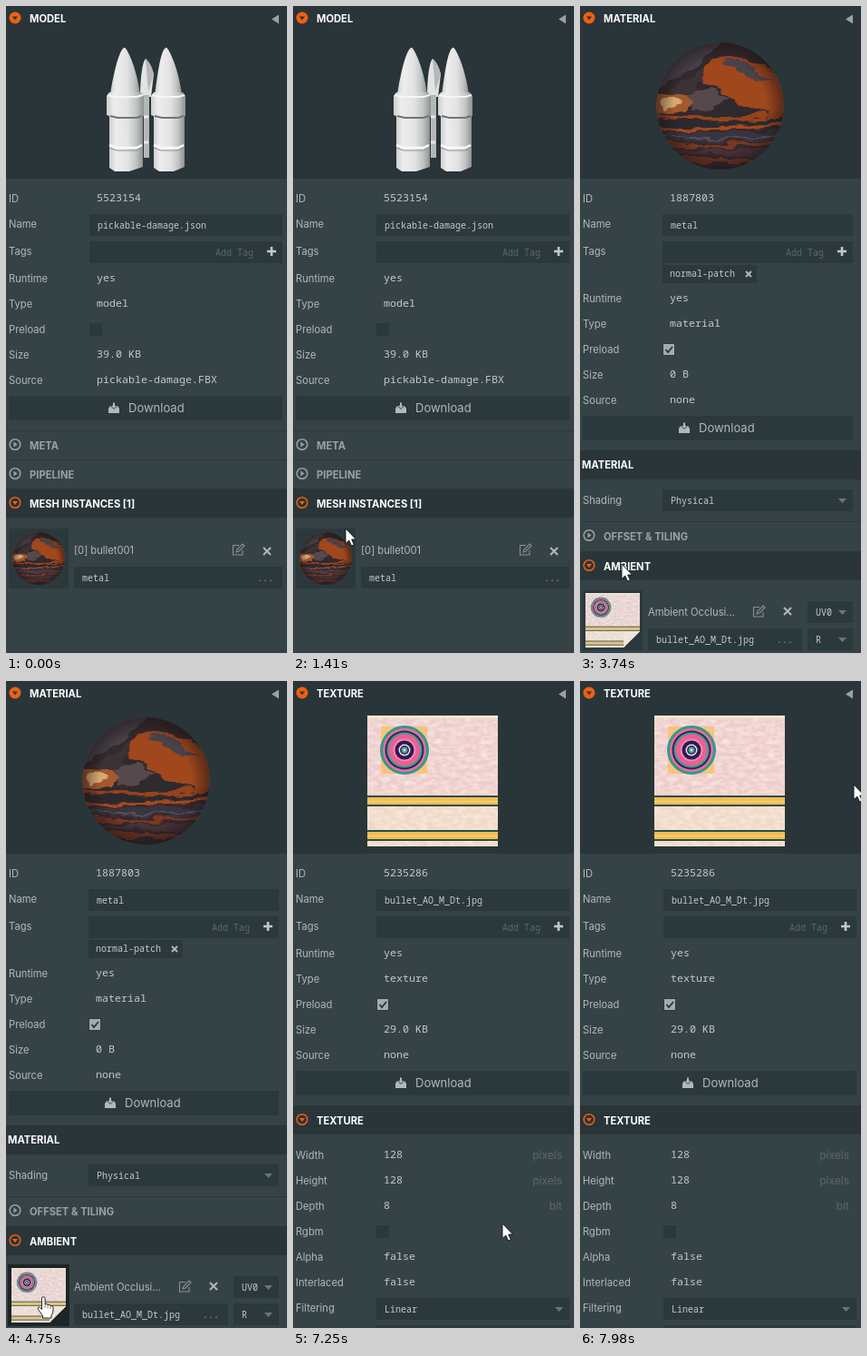
These frames come from a looping animation (310 px wide and 712 px high, 8000 ms). An HTML page:

```html
<!DOCTYPE html>
<html lang="en">
<head>
<meta charset="utf-8">
<title>Asset inspector</title>
<style>
html, body { margin: 0; width: 100%; height: 100%; overflow: hidden; background: #364346; }
svg { display: block; width: 310px; height: 712px; }
text { font-family: Inter, Roboto, sans-serif; font-size: 11.2px; white-space: pre; }
.head { font-size: 11.2px; font-weight: 700; }
.big { font-size: 13px; }
.unit { font-size: 12px; }
.value, .field { font-family: "Noto Sans Mono", "DejaVu Sans Mono", monospace; }
.value { font-size: 11.67px; }
.field { font-size: 10px; }
</style>
</head>
<body>
<svg id="stage" viewBox="0 0 310 712" xmlns="http://www.w3.org/2000/svg"></svg>
<script>
const LOOP = 8000;
const BODY = '#364346', DARK = '#293538', FIELD = '#2c393c', HOVER = '#202a2c';
const GREY = '#9ba1a3', LIGHT = '#b1b8ba', PALE = '#c3c9ca', DIM = '#5b686b', ORANGE = '#ee6011';

// Drawing helpers
const rect = (x, y, w, h, fill) => `<rect x="${x}" y="${y}" width="${w}" height="${h}" fill="${fill}"/>`;
const path = (d, fill, more = '') => `<path d="${d}" fill="${fill}" ${more}/>`;
const line = (d, color, width) => path(d, 'none', `stroke="${color}" stroke-width="${width}"`);
const text = (x, y, str, kind = '', fill = LIGHT, anchor = 'start') =>
  `<text x="${x}" y="${y + 4}" class="${kind}" fill="${fill}" text-anchor="${anchor}">${str}</text>`;
const at = (x, y, body, scale = 1) => `<g transform="translate(${x} ${y}) scale(${scale})">${body}</g>`;
const hoverable = (id, body) => `<g id="${id}" opacity="0">${body}</g>`;

const label = (y, str) => text(3, y - 0.5, str);
const value = (x, y, str) => text(x, y - 1, str, 'value', PALE);

// Icons
const cross = (x, y, r) => line(`M${x - r} ${y - r}l${2 * r} ${2 * r}m0 ${-2 * r}l${-2 * r} ${2 * r}`, LIGHT, 2);
const plus = (x, y) => line(`M${x - 5} ${y}h10m-5 -5v10`, PALE, 2.6);
const edit = (x, y) =>
  line(`M${x + 1} ${y - 4.5}h-6.500v10.500h10.500v-5`, '#889193', 1.1) +
  line(`M${x - 2} ${y + 3}l1 -3 6 -6 2 2 -6 6z`, '#889193', 1.1);

function ring(x, y, open, color) {
  const tri = open ? `M${x - 3} ${y - 1.5}h6l-3 4z` : `M${x - 1.5} ${y - 3}v6l4 -3z`;
  return `<circle cx="${x}" cy="${y}" r="5.8" fill="none" stroke="${color}" stroke-width="1.5"/>` + path(tri, color);
}

function check(x, y, on) {
  return rect(x, y, 14, 14, FIELD) + (on ? rect(x + 1, y + 1, 12, 12, '#a3abad') +
    line(`M${x + 3.5} ${y + 7}l2.500 3 5 -6`, DARK, 1.8) : '');
}

// Panel parts
function download(id, right, y) {
  const x = right - 192;
  const draw = (bg, fg) => rect(3, y, right - 3, 27, bg) +
    path(`M${x} ${y + 19}v-5l2 -3h8l2 3v5z`, fg) +
    path(`M${x + 4.5} ${y + 7}h3v3.500h2.500l-4 4 -4 -4h2.500z`, fg, `stroke="${bg}"`) +
    text(x + 22, y + 14, 'Download', 'big', fg);
  return draw(FIELD, LIGHT) + hoverable(`${id}-download`, draw(HOVER, '#fff'));
}

function field(x, y, right, str = '', dots = 0, id = '') {
  return rect(x, y, right - x, 24, FIELD) + (id && hoverable(id, rect(x, y, right - x, 24, HOVER))) +
    text(x + 9, y + 12, str, 'field', PALE) + (dots ? text(dots, y + 12, '...', 'field', GREY) : '');
}

const select = (x, y, right, str, id) =>
  field(x, y, right, str, 0, id) + path(`M${right - 16} ${y + 10}h9l-4.500 5z`, '#697679');

function section(y, title, open, id) {
  const head = (bg, icon, color) =>
    rect(0, y, 310, 32, bg) + ring(10, y + 15.5, open, icon) + text(26, y + 17, title, 'head', color);
  return (open ? head(DARK, ORANGE, '#fff') : head(BODY, GREY, GREY) + rect(0, y, 310, 1, '#2b373a')) +
    (id ? hoverable(id, head(HOVER, open ? ORANGE : '#fff', '#fff')) : '');
}

const row = (x, y, name, val) =>
  label(y, name) + (typeof val === 'string' ? value(x + 8, y, val) : check(x, y - 7, val));

function panel(title, preview) {
  return rect(0, 0, 310, 712, BODY) + rect(0, 0, 310, 190, DARK) +
    `<circle cx="10" cy="13" r="6.500" fill="${ORANGE}"/>` + path('M7 11.500h6l-3 4z', DARK) +
    text(26, 14, title, 'head', '#fff') + path('M301 9.500v10l-8 -5z', GREY) + preview;
}

function asset({ id, key, name, values, x = 92, right = 305, shift = 0 }) {
  const names = ['Runtime', 'Type', 'Preload', 'Size', 'Source'];
  return row(x, 212, 'ID', id) +
    text(3, 240, 'Name') + field(x, 229, right, name, 0, `${key}-name`) +
    text(3, 270, 'Tags') + field(x, 259, right, '', 0, `${key}-tags`) +
    text(right - 32, 271, 'Add Tag', 'field', DIM, 'end') + plus(right - 12, 270) +
    names.map((n, i) => row(x, 300 + shift + i * 28, n, values[i])).join('') +
    download(key, right, 429 + shift);
}

// Artwork
function rocket(tip, left, right) {
  const fill = 'url(#shell)', l = left + 4, r = right - 4;
  return path(`M${l} 98C${l + 3} 78 ${tip - 7} 50 ${tip - 1} 46Q${tip} 45 ${tip + 2} 48C${tip + 9} 60 ${r - 2} 80 ${r} 98z`, fill) +
    path(`M${left + 3} 120v58l6 4h16l${right - left - 26} -5v-57z`, fill) +
    path(`M${left} 99l3 -4H${right - 3}l3 4v22l-5 2H${left + 8}l-8 -3z`, fill) +
    line(`M${left + 1} 98l7 2H${right - 8}l7 -2`, '#f6f6f6', 2) +
    line(`M${left + 4} 121l8 2H${right - 8}l6 -2`, '#717576', 2) +
    line(`M${left + 3} 153l8 3H${right - 8}l6 -3`, '#f8f8f8', 2.5) +
    line(`M${left + 3} 156l8 3H${right - 8}l6 -3`, '#8f9394', 1.2);
}
const model =
  path('M148 100C148 82 150 62 154 58Q160 63 163 75L160 100z', '#e2e3e3') +
  path('M154 58Q160 63 163 75L157 94z', '#b4b7b8') + path('M152 98h6v69h-6z', '#b4b7b8') +
  line('M152 122h5M152 150h5', '#e9e9e9', 3) + rocket(131, 111, 152) + rocket(177, 160, 198);

const metal = `<g clip-path="url(#ball)"><rect width="140" height="140" fill="#34292c"/><g filter="url(#rough)">` +
  path('M-10 55Q20 45 50 20L75 -5H-10z', '#49434a') +
  path('M-5 62Q25 48 62 18L75 26Q45 62 5 74z', '#3a3134') +
  path('M55 22Q90 2 150 45V92Q95 82 78 62L50 45z', '#a0471f') +
  path('M72 20Q100 14 128 44L105 40z', '#4a434a') +
  path('M50 40L82 62Q95 78 145 80V94H55Q60 65 42 50z', '#2f2a2f') +
  path('M-5 60Q15 52 28 56L40 66 32 76 -5 78z', '#a4592f') + path('M4 62l14 -3 10 8 -20 5z', '#d6aa72') +
  path('M34 60l28 -9 18 12 -14 8 -26 3z', '#57494c') +
  line('M0 82Q70 89 140 79', '#98421f', 5) + line('M0 94Q70 98 140 90', '#a8481c', 4) +
  line('M0 88Q70 93 140 85', '#2b292e', 3) + rect(-5, 99, 150, 10, '#393640') +
  line('M0 111Q70 116 140 110', '#7d3822', 4) + line('M0 121H140', '#473338', 6) +
  line('M15 130H125', '#723621', 6) + line('M8 104Q70 109 132 103', '#605560', 1.5) +
  `</g><circle cx="70" cy="70" r="70" fill="url(#shade)"/></g>`;

const target = [[27, '#2c9c8c'], [24, '#ee6d9c'], [21.5, '#35215f'], [19.5, '#2fa48e'], [17.5, '#ed5f94'],
  [12.5, '#f18ab0'], [10.5, '#2c1b58'], [6.5, '#f2e2df'], [5, '#38225f'], [3.4, '#3aa78f'], [1.5, '#f5d9d5']];
const band = y => rect(0, y, 144, 12, '#24504a') + rect(0, y + 2, 144, 8, '#f2bd55') + rect(0, y + 6, 144, 1, '#f9d784');
const texture = square => rect(0, 0, 144, 144, '#eecbcb') +
  rect(0, 100, 144, 44, '#f0d8c6') + `<rect width="144" height="144" filter="url(#grain)"/>` +
  rect(0, 0, 144, 3, '#f6e9c8') + (square ? rect(15, 12, 51, 52, '#f8c47d') : '') +
  target.map(([r, c]) => `<circle cx="41" cy="38" r="${r}" fill="${c}"/>`).join('') + band(88) + band(126);

const thumb = (y, id, art) => rect(3, y, 66, 66, FIELD) + hoverable(id, rect(2, y - 1, 68, 68, '#1d2526')) + art;

const defs = `<defs>
<linearGradient id="shell"><stop stop-color="#cdcece"/><stop offset=".2" stop-color="#ededed"/><stop offset=".55" stop-color="#e3e3e3"/><stop offset=".8" stop-color="#c2c4c4"/><stop offset="1" stop-color="#8d9091"/></linearGradient>
<radialGradient id="shade"><stop offset=".72" stop-color="#150f12" stop-opacity="0"/><stop offset="1" stop-color="#150f12" stop-opacity=".5"/></radialGradient>
<clipPath id="ball"><circle cx="70" cy="70" r="70"/></clipPath>
<clipPath id="fold"><path d="M0 0H144V101L101 144H0z"/></clipPath>
<filter id="rough"><feTurbulence type="fractalNoise" baseFrequency=".04 .1" numOctaves="3" seed="4"/><feDisplacementMap in="SourceGraphic" scale="13" xChannelSelector="R" yChannelSelector="G"/></filter>
<filter id="grain" x="0" y="0" width="1" height="1"><feTurbulence type="fractalNoise" baseFrequency=".12 .22" numOctaves="3" seed="8"/><feColorMatrix values="0 0 0 0 .96 0 0 0 0 .88 0 0 0 0 .8 1.500 0 0 0 -.5"/></filter>
</defs>`;

const modelScene = panel('MODEL', model) +
  asset({ id: '5523154', key: 'model', name: 'pickable-damage.json',
    values: ['yes', 'model', false, '39.0 KB', 'pickable-damage.FBX'] }) +
  section(467, 'META', false, 'meta') + section(499, 'PIPELINE', false, 'pipeline') +
  section(531, 'MESH INSTANCES [1]', true, 'mesh') +
  thumb(575, 'ball-thumb', at(7, 579, metal, 0.414)) +
  text(75, 599, '[0] bullet001') + edit(256, 598) + cross(288, 600, 4) + field(75, 617, 305, 'metal', 277);

const materialScene = panel('MATERIAL', at(84.5, 40, metal)) +
  asset({ id: '1887803', key: 'material', name: 'metal', values: ['yes', 'material', true, '0 B', 'none'],
    x: 91, right: 301, shift: 22 }) +
  rect(91, 285, 104, 20, FIELD) + text(99, 294, 'normal-patch', 'field', PALE) + cross(186, 295, 3) +
  rect(0, 489, 310, 32, DARK) + text(2, 505, 'MATERIAL', 'head', '#fff') +
  label(544, 'Shading') + select(91, 532, 301, 'Physical') +
  section(567, 'OFFSET &amp; TILING', false) + section(600, 'AMBIENT', true) +
  thumb(643, 'map-thumb', at(6, 646,
    `<g clip-path="url(#fold)" style="filter:saturate(.65)">${texture(false)}</g>` + path('M144 101L101 144V101z', '#f3e4da'), 0.417)) +
  text(75, 667, 'Ambient Occlusi...') + edit(197, 666) + cross(229, 666, 4) + select(251, 655, 301, 'UV0') +
  field(75, 685, 245, 'bullet_AO_M_Dt.jpg', 217) + select(251, 685, 301, 'R');

const unit = (y, str) => text(297, y, str, 'unit', DIM, 'end');
const details = [['Width', '128'], ['Height', '128'], ['Depth', '8'], ['Rgbm', false], ['Alpha', 'false'], ['Interlaced', 'false']];
const textureScene = panel('TEXTURE', at(82, 38, texture(true))) +
  asset({ id: '5235286', key: 'texture', name: 'bullet_AO_M_Dt.jpg', values: ['yes', 'texture', true, '29.0 KB', 'none'] }) +
  section(467, 'TEXTURE', true) +
  details.map(([name, val], i) => row(92, 522 + i * 28, name, val)).join('') +
  unit(522, 'pixels') + unit(550, 'pixels') + unit(578, 'bit') +
  label(690, 'Filtering') + select(92, 679, 305, 'Linear', 'filter') + rect(92, 709, 213, 3, FIELD);

const outline = 'stroke="#111" stroke-width=".9" stroke-linejoin="round"';
const arrow = path('M0 0V16.500L3.800 13 6.500 19 9.300 17.800 6.700 12H11.500z', '#fff', outline);
const hand = path('M-1.500 1.500a1.800 1.800 0 0 1 3.600 0V8q2-1.200 3 .6q2-.8 3 .9q2.400-.4 2.900 1.600V15q0 3-2 5V23H-.5V20.500L-5.500 13.500q-1-2 .8-2.500q1.200 0 3.200 2.500z', '#fff', outline) +
  line('M2.100 8v4M5.100 9v3.500M8.100 10v3', '#444', 0.7);

const stage = document.getElementById('stage');
stage.innerHTML = defs + [modelScene, materialScene, textureScene].map((s, i) => `<g id="scene${i}">${s}</g>`).join('') +
  `<g id="cursor"><g id="arrow">${arrow}</g><g id="hand">${hand}</g></g>`;
const el = id => document.getElementById(id);

// Timeline: [time, value...]
const scenes = [[0, 0], [2560, 1], [5450, 2]];
const pointers = [[0, 'arrow'], [720, 'hand'], [1300, 'arrow'], [1430, 'hand'], [2270, 'arrow'], [2410, 'hand'],
  [2560, 'arrow'], [3960, 'hand'], [5270, 'arrow'], [7350, 'hand'], [7395, 'arrow']];
const route = [[0, -14, 446], [500, -14, 446], [760, 36, 480], [970, 65, 537], [1300, 64, 564], [1330, 63, 565],
  [1660, 41, 605], [3670, 41, 606], [4000, 64, 644], [4470, 42, 663], [4750, 41, 678], [6210, 42, 678],
  [6220, 43, 678], [6640, 43, 678], [6790, 74, 693], [7050, 186, 652], [7250, 231, 598], [7420, 258, 410],
  [7450, 262, 398], [7700, 286, 240], [7980, 302, 114], [8000, 302, 114]];
const hovers = [['meta', 720, 855], ['pipeline', 855, 985], ['mesh', 985, 1290], ['ball-thumb', 1420, 2560],
  ['map-thumb', 3960, 5450], ['filter', 6830, 6990], ['texture-download', 7350, 7395],
  ['texture-tags', 7625, 7670], ['texture-name', 7680, 7720]];
const FADE = 70;

const clamp = v => Math.max(0, Math.min(1, v));
const current = (track, t) => track.filter(([start]) => start <= t).pop()[1];

function cursorAt(t) {
  const i = Math.max(1, route.findIndex(key => key[0] > t));
  const [t0, x0, y0] = route[i - 1], [t1, x1, y1] = route[i];
  const k = (t - t0) / (t1 - t0);
  return [x0 + (x1 - x0) * k, y0 + (y1 - y0) * k].map(Math.round);
}

function render(t) {
  const scene = current(scenes, t), pointer = current(pointers, t);
  for (let i = 0; i < 3; i++) el(`scene${i}`).style.display = i === scene ? '' : 'none';
  for (const id of ['arrow', 'hand']) el(id).style.display = id === pointer ? '' : 'none';
  for (const [id, on, off] of hovers)
    el(id).setAttribute('opacity', clamp((t - on) / FADE) * clamp(1 - (t - off) / FADE));
  el('cursor').setAttribute('transform', `translate(${cursorAt(t)})`);
}

const start = performance.now();
function tick() {
  render((performance.now() - start) % LOOP);
  requestAnimationFrame(tick);
}
render(0);
requestAnimationFrame(tick);
</script>
</body>
</html>
```
